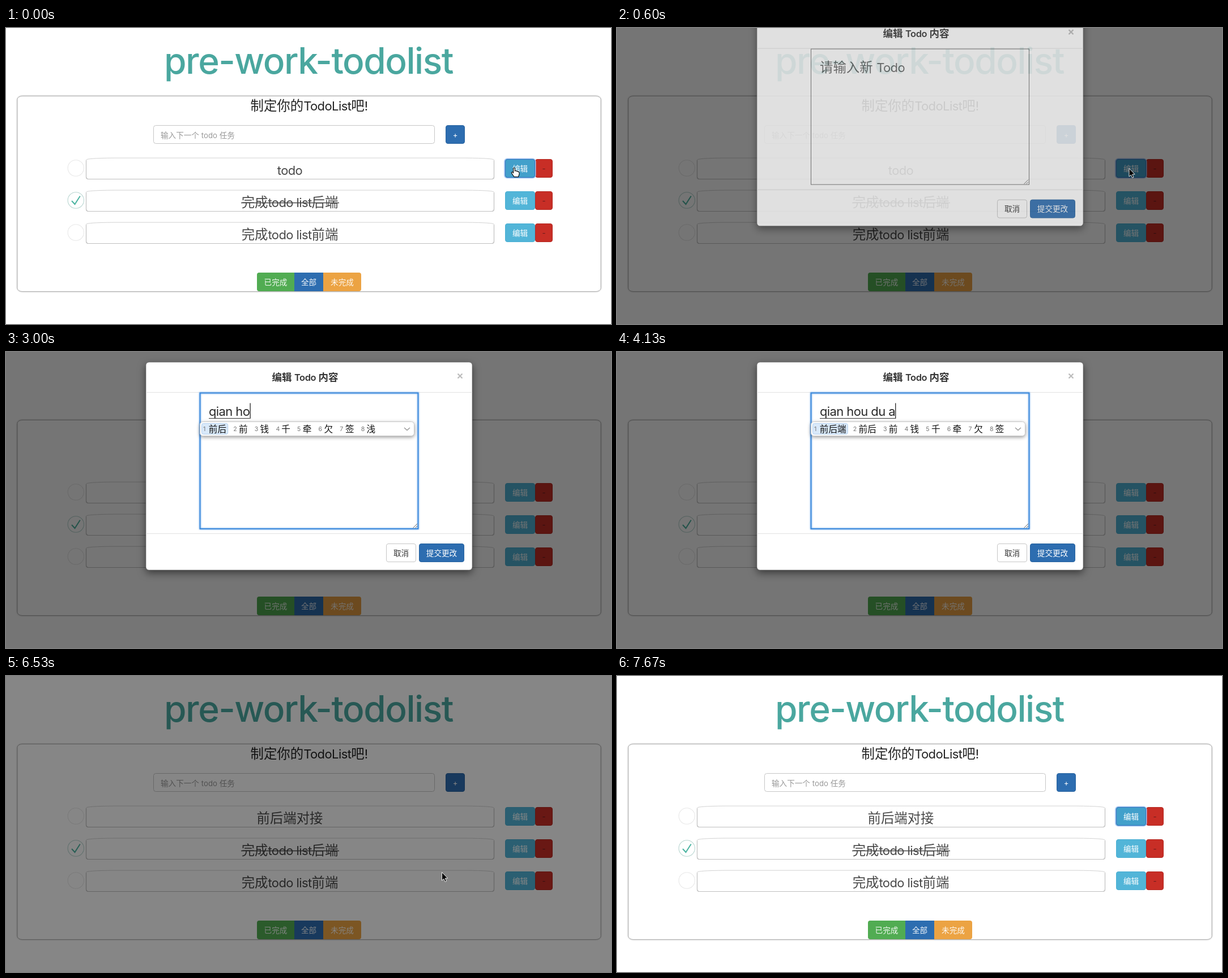
These frames come from a looping animation (1068 px wide and 524 px high, 7.74 s). An HTML page:

```html
<!DOCTYPE html>
<html lang="zh-CN">
<head>
<meta charset="utf-8">
<style>
html, body { margin: 0; width: 100%; height: 100%; overflow: hidden; background: #fff; }
svg { display: block; width: 1068px; height: 524px; }
text { font-family: Inter, "Noto Sans CJK SC", "Noto Sans CJK", sans-serif; font-optical-sizing: none; white-space: pre; }
.en { font-size: .94em; letter-spacing: -.027em; }
.small .en { font-size: .97em; letter-spacing: 0; }
#title { font-weight: 540; letter-spacing: -.0235em; }
#panel { filter: drop-shadow(0 0 1px rgba(0,0,0,.3)); }
#dialog { filter: drop-shadow(0 5px 7px rgba(0,0,0,.5)); }
#bar rect:first-child { filter: drop-shadow(0 2px 3px rgba(0,0,0,.4)); }
#ring { filter: drop-shadow(0 0 1.5px #4a96e6); }
</style>
</head>
<body>
<svg id="stage" viewBox="0 0 1068 524"></svg>
<script>
const LOOP = 7740, FRAME = 1000 / 15;
const $ = id => document.getElementById(id);
const latin = s => s.replace(/[!-~]+( [!-~]+)*/g, m => `<tspan class="en">${m}</tspan>`);

const text = (x, y, size, fill, s, anchor = 'middle', attrs = '') =>
  `<text x="${x}" y="${y}" font-size="${size}" fill="${fill}" text-anchor="${anchor}" class="${size < 16 ? 'small' : ''}" ${attrs}>${latin(s)}</text>`;

const box = (x, y, w, h, fill, stroke, r = 4, attrs = '') =>
  `<rect x="${x + .5}" y="${y + .5}" width="${w - 1}" height="${h - 1}" rx="${r}" fill="${fill}" stroke="${stroke}" ${attrs}/>`;

const button = (x, y, w, fill, stroke, label, color = '#fff') =>
  box(x, y, w, 33, fill, stroke, 3.5) + text(x + w / 2, y + 21.5, 13.6, color, label);

// Button group segment with optional rounded ends
const segment = (x, w, fill, label, left, right) => {
  const a = left ? 4 : 0, b = right ? 4 : 0;
  return `<path d="M${x + a} 433H${x + w - b}q${b} 0 ${b} ${b}V${466 - b}q0 ${b} ${-b} ${b}H${x + a}q${-a} 0 ${-a} ${-a}V${433 + a}q0 ${-a} ${a} ${-a}z" fill="${fill}"/>`
    + text(x + w / 2, 455, 13.6, '#fff', label, 'middle', 'fill-opacity=".92"');
};

const row = (y, label, done, id) => `<g transform="translate(0 ${y})">
  <circle cx="123.3" cy="18.5" r="14.2" fill="none" stroke="${done ? '#b9d6d1' : '#e8e8e8'}" stroke-width="1.1"/>
  ${done ? '<path d="M116 19.5L121.5 25.5L130.8 11" fill="none" stroke="#4db5a2" stroke-width="2"/>' : ''}
  <path d="M141.5 34V4Q142 1 190 .6H812Q861 1 861.5 4V34q0 4-4 4H145.5q-4 0-4-4z" fill="#fff" stroke="#d2d2d2"/>
  <path d="M141.5 5V34q0 4 4 4H857.5q4 0 4-4V5" fill="none" stroke="#c0c0c0" stroke-width="1.2"/>
  ${text(501, 30.7, 23.4, '#484848', label, 'middle', id ? `id="${id}"` : '')}
  ${done ? '<path d="M415 23H588" stroke="#484848" stroke-width="1.6"/>' : ''}
  ${button(881, 2.5, 53, '#52b5d8', '#4bafd3', '编辑')}
  ${button(934, 2.5, 31, '#c82e26', '#b52b24', '-', '#6a1c1c')}
</g>`;

$('stage').innerHTML = `
<rect width="1068" height="524" fill="#fff"/>
${text(534, 81, 64, '#4aa79f', '', 'middle', 'id="title"')}
<rect id="panel" x="20" y="120.5" width="1030" height="346" rx="9" ry="6" fill="#fff" stroke="#b0b0b0"/>
${text(535, 146, 23.4, '#222', '制定你的TodoList吧!')}
${box(260, 172, 497, 33, '#fff', '#c6c6c6')}
${text(273, 194.5, 13.6, '#999', '输入下一个 todo 任务', 'start')}
${button(776, 172, 34, '#2d6db0', '#28639f', '+')}
${row(229.5, 'todo', false, 'first')}
${row(286.5, '完成todo list后端', true)}
${row(343.5, '完成todo list前端', false)}
<g id="active">
  <rect x="880" y="231.5" width="54.5" height="34" rx="5" fill="none" stroke="#a5c8f2" stroke-width="2"/>
  ${button(881, 232, 53, '#42a0cb', '#2f70bb', '编辑')}
</g>
${segment(443, 66, '#51ac52', '已完成', true, false)}
${segment(509, 51, '#2d6db0', '全部', false, false)}
${segment(560, 67, '#eca343', '未完成', false, true)}
<rect id="shade" width="1068" height="524"/>
<g id="modal">
  <rect id="dialog" x="247" y="18" width="576" height="368" rx="5.5" fill="#fff" stroke="#666" stroke-opacity=".6"/>
  ${text(528, 51, 17.5, '#333', '编辑 Todo 内容', 'middle', 'font-weight="600"')}
  <path d="M797.5 38.5l8 8m0-8l-8 8" stroke="#bcbcbc" stroke-width="2.2"/>
  <path d="M247 71.5H823M247 321.5H823" stroke="#e2e2e2"/>
  ${box(342, 72, 386, 241, '#fff', '#707070', 0)}
  <rect id="ring" x="342.5" y="72.5" width="385" height="240.5" fill="none" stroke="#3f8bdc" stroke-width="2"/>
  <path d="M718.5 311.5l7.5-7.5m-3.5 7.5l3.5-3.5" stroke="#666"/>
  ${text(358, 113, 23.4, '#333', '', 'start', 'id="entry"')}
  <path id="under" stroke="#333" stroke-width="1.2"/>
  <path id="caret" stroke="#111" stroke-width="1.2"/>
  ${button(671, 339, 53, '#fff', '#c6c6c6', '取消', '#333')}
  ${button(729, 339, 80, '#2d6db0', '#28639f', '提交更改')}
</g>
<g id="bar"></g>
<g id="cursor">
  <path id="arrow" d="M0 .5V15L3.3 12L5.6 17.2L8 16.2L5.7 11H10.2Z" fill="#000" stroke="#fff" stroke-width=".9"/>
  <path id="hand" d="M-1.4 1.5q1.4-2.6 2.8 0V6q2-1.2 2.6.6q2-.8 2.6.8q2-.4 2.4 1.6V12L7.4 16.5H0L-4.4 10q-.8-2.4 1.6-2l1.4 1.4Z" fill="#fff" stroke="#000" stroke-width="1.1"/>
  <path id="beam" d="M-3-8q3 0 3 2V6q0 2-3 2M3-8q-3 0-3 2V6q0 2 3 2" fill="none" stroke="#333"/>
</g>`;
$('title').textContent = 'pre-work-todolist';

// Time, committed text, pinyin being composed, candidates
const keys = [
  [0, '', '', ''],
  [1730, '', 'q', '去 请 前 其 起 全 却 且 期'],
  [1790, '', 'qi', '其 起 七 7 期 气 奇 齐 骑'],
  [2130, '', 'qia', '恰 卡 洽 掐 其 起 七 期 气'],
  [2330, '', 'qian', '前 钱 千 牵 欠 签 浅 潜 迁'],
  [2660, '', 'qian h', '前后 前 钱 千 牵 欠 签 浅'],
  [2860, '', 'qian ho', '前后 前 钱 千 牵 欠 签 浅'],
  [3060, '', 'qian hou', '前后 前 钱 千 牵 欠 签 浅'],
  [3530, '', 'qian hou d', '前后的 前后 前 钱 千 牵 欠 签'],
  [3800, '', 'qian hou du', '前后都 前后 前 钱 千 牵 欠 签'],
  [4060, '', 'qian hou du a', '前后端 前后 前 钱 千 牵 欠 签'],
  [4260, '', 'qian hou duan', '前后端 前后 前 钱 千 牵 欠 签'],
  [4460, '前后端', '', ''],
  [4600, '前后端', 'd', '的 到 都 大 对 但 等 多 地'],
  [4700, '前后端', 'du', '都 读 度 独 毒 堵 肚 渡 赌'],
  [4800, '前后端', 'dui', '对 队 堆 兑 怼 碓 都 读 度'],
  [4930, '前后端', 'dui j', '对接 对 队 堆 兑 怼 碓 都'],
  [5000, '前后端', 'dui ji', '对接 对 队 堆 兑 怼 碓 都'],
  [5060, '前后端', 'dui jie', '对接 对 队 堆 兑 怼 碓 都'],
  [5260, '前后端对接', '', '']
];

// Time, x, y
const path = [
  [0, 897, 247], [200, 897, 247], [300, 904, 248], [820, 904, 248], [1200, 450, 110],
  [5500, 450, 110], [5800, 775, 301], [6000, 769.5, 347], [6850, 769.5, 347], [7150, 830, 545]
];

const clamp = v => Math.max(0, Math.min(1, v));
const show = (id, on) => $(id).setAttribute('visibility', on ? 'inherit' : 'hidden');

function pointer(t) {
  const i = path.findIndex(p => p[0] > t);
  if (i < 0) return path[path.length - 1].slice(1);
  const [a, b] = [path[i - 1], path[i]];
  const k = clamp((t - a[0]) / (b[0] - a[0])), e = k * k * (3 - 2 * k);
  return [a[1] + (b[1] - a[1]) * e, a[2] + (b[2] - a[2]) * e];
}

function candidates(left, list) {
  if (!list) return '';
  let x = left + 6, out = box(left, 123, 379, 26, '#fff', '#c8c8c8', 5);
  list.split(' ').forEach((word, i) => {
    const w = word.length * 15.6;
    if (!i) out += box(x - 3, 126, w + 16, 20, '#d9e9fa', '#b4d0ee', 3);
    out += text(x, 139.5, 11, '#777', String(i + 1), 'start');
    out += word === '7'
      ? box(x + 10, 125, 20, 20, '#54789c', '#44688c', 3) + text(x + 20, 140, 14, '#fff', '7', 'middle', 'font-weight="700"')
      : text(x + 9.8, 141.8, 15.6, '#111', word, 'start');
    x += 22 + w + (word === '7' ? 5 : 0);
  });
  return out + `<path d="M${left + 361} 134l5 4.5l5-4.5" fill="none" stroke="#999" stroke-width="1.4"/>`;
}

function typing(t) {
  const [since, done, comp, list] = keys.filter(k => k[0] <= t).pop();
  const focus = t >= 1230, entry = $('entry');
  show('ring', focus);
  const empty = !done && !comp;
  entry.setAttribute('fill', empty ? '#666' : '#2a2a2a');
  entry.innerHTML = latin(empty ? '请输入新 Todo' : done + comp);
  const start = 358 + done.length * 23.4;
  const end = empty ? 358 : 358 + entry.getComputedTextLength();
  $('under').setAttribute('d', comp ? `M${start} 117.5H${end}` : '');
  const blink = Math.floor((t - Math.max(since, 1230)) / 560) % 2 === 0;
  $('caret').setAttribute('d', focus && (comp || blink) ? `M${end + .8} 90.5V118` : '');
  $('bar').innerHTML = candidates(start - 16, list);
}

function draw(t) {
  const opening = t < 4000;
  const since = t - 483, closing = t - 6215;
  const fade = opening ? clamp(since / 150) : 1 - clamp(closing / 150);
  const slide = clamp((opening ? since : closing) / 300);
  const eased = 1 - Math.pow(1 - slide, 1.7);
  const lift = opening ? 1 - eased : eased;
  const shade = opening ? clamp((t - 333) / 150) : 1 - clamp((t - 6515) / 150);

  $('shade').setAttribute('fill-opacity', .54 * shade);
  $('modal').setAttribute('opacity', fade);
  $('modal').setAttribute('transform', `translate(0 ${-82 * lift})`);
  show('modal', fade > 0);
  show('active', t < 783 || t > 6665);
  $('first').innerHTML = latin(t < 6220 ? 'todo' : '前后端对接');
  typing(t);

  const [x, y] = pointer(t);
  const hand = t < 330 || (t < 6220 && t > 5800 && y > 339);
  const beam = t > 800 && t < 6220 && x > 343 && x < 728 && y > 72 && y < 313;
  show('cursor', t < 1700 || t > 5550);
  show('hand', hand);
  show('beam', beam);
  show('arrow', !hand && !beam);
  $('cursor').setAttribute('transform', `translate(${x} ${y})`);
}

function tick() {
  const t = performance.now() % LOOP;
  draw(Math.floor((t + 4) / FRAME) * FRAME);
  requestAnimationFrame(tick);
}
tick();
</script>
</body>
</html>
```
